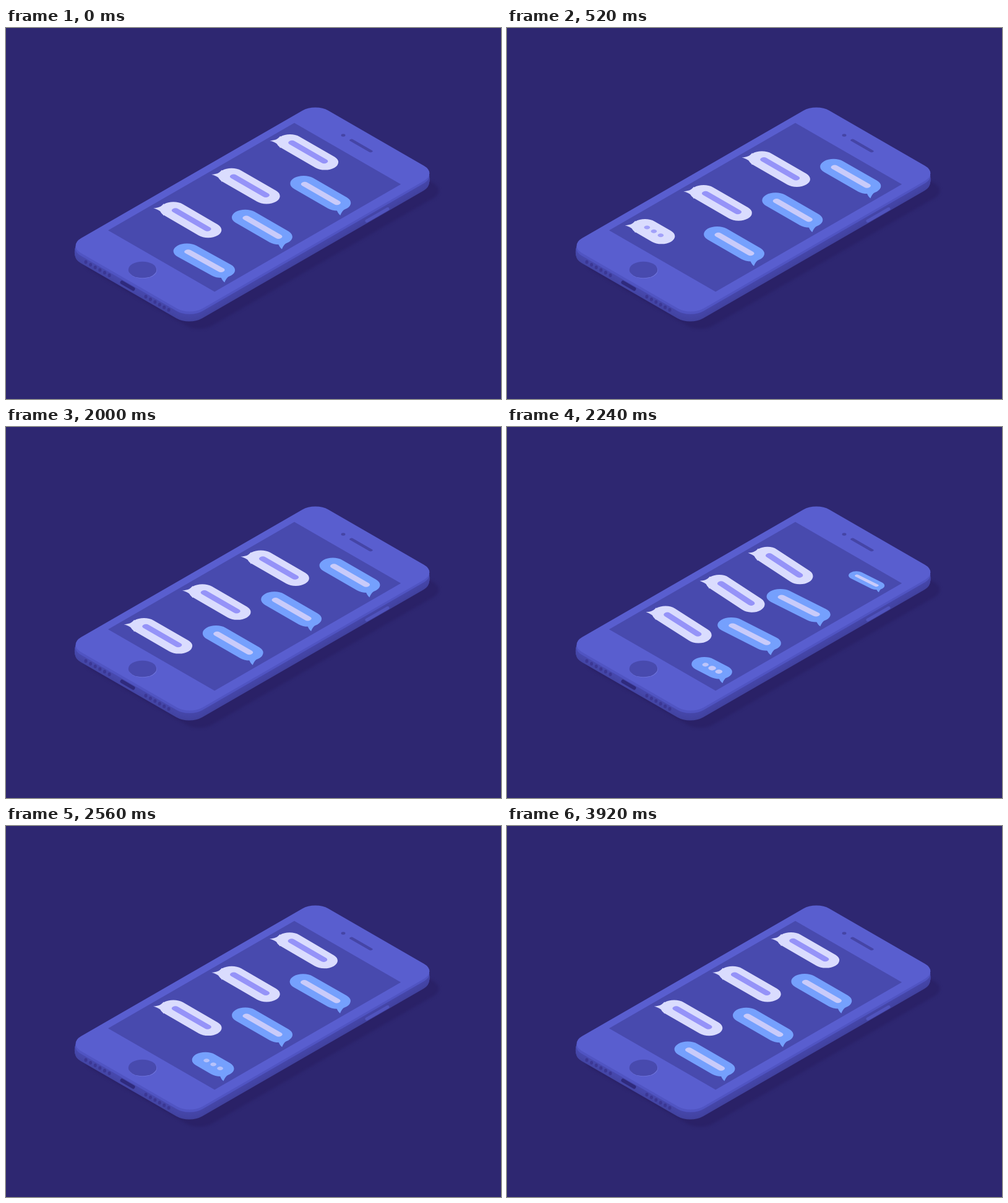
These frames come from a looping animation (800x600 px, 3960 ms). An HTML page with a canvas:

```html
<!DOCTYPE html>
<html lang="en">
<head>
<meta charset="utf-8">
<title>Chat on a phone</title>
<style>
  html, body { margin: 0; width: 100%; height: 100%; overflow: hidden; background: #2e2771; }
  canvas { display: block; width: 800px; height: 600px; }
</style>
</head>
<body>
<canvas id="stage" width="800" height="600"></canvas>
<script>
const ctx = document.getElementById('stage').getContext('2d');
const LOOP = 3960, LEAD = 40;
const COS = 0.866, SIN = 0.5;
const STEP = { x: 47.2, y: -27.4 };
const LAG = 28, REACH = 97;

const clamp = v => Math.max(0, Math.min(1, v));

// Damped spring from 0 to 1; a smaller damp overshoots more
function spring(ms, speed, damp) {
  if (ms <= 0) return 0;
  const x = ms * speed;
  return 1 - Math.exp(-damp * x) * (Math.cos(x) + damp * Math.sin(x));
}
const slide = ms => spring(ms, 0.0059, 1.6);
const pop = ms => spring(ms, 0.0105, 1);

function iso(x, y, draw) {
  ctx.save();
  ctx.transform(COS, SIN, -COS, SIN, x, y);
  draw();
  ctx.restore();
}

// Capsule lying on the screen plane, running across the phone
function capsule(x, y, len, r, color) {
  iso(x, y, () => {
    ctx.lineCap = 'round';
    ctx.lineWidth = 2 * r;
    ctx.strokeStyle = color;
    ctx.beginPath();
    ctx.moveTo(0, 0);
    ctx.lineTo(len || 0.01, 0);
    ctx.stroke();
  });
}

function slab(dx, dy, r, color) {
  iso(500 + dx, 145.4 + dy, () => {
    ctx.fillStyle = color;
    ctx.beginPath();
    ctx.roundRect(-r, -r, 179 + 2 * r, 413.4 + 2 * r, r);
    ctx.fill();
  });
}

function oval(x, y, rx, ry, color) {
  ctx.fillStyle = color;
  ctx.beginPath();
  ctx.ellipse(x, y, rx, ry, 0, 0, 7);
  ctx.fill();
}

function bar(x1, y1, x2, y2, width, color) {
  ctx.lineCap = 'round';
  ctx.lineWidth = width;
  ctx.strokeStyle = color;
  ctx.beginPath();
  ctx.moveTo(x1, y1);
  ctx.lineTo(x2, y2);
  ctx.stroke();
}

function drawPhone() {
  ctx.fillStyle = '#2e2771';
  ctx.fillRect(0, 0, 800, 600);

  ctx.save();
  ctx.filter = 'blur(2px)';
  slab(15, 28, 24, '#2a2167');
  ctx.restore();

  for (let dy = 16; dy >= 5; dy--) {
    const k = (16 - dy) / 11;
    const side = ctx.createLinearGradient(110, 0, 690, 0);
    side.addColorStop(0, `hsl(239 42% ${45 + 3 * k}%)`);
    side.addColorStop(0.25, `hsl(240 42% ${43 + 3 * k}%)`);
    side.addColorStop(0.35, `hsl(242 42% ${41 + 2 * k}%)`);
    side.addColorStop(1, `hsl(242 42% ${42 + 2 * k}%)`);
    slab(-0.8, dy, 24 + 0.8 * Math.sin(Math.PI * k), side);
  }
  slab(-0.3, 4, 24.2, '#5054c2');
  slab(0, 0, 24, '#595ecf');

  for (let i = 0; i < 6; i++) {
    oval(129 + 7.6 * i, 378.5 + 4.3 * i, 2.5, 2.9, '#3b3794');
    oval(226 + 7.4 * i, 434.5 + 4.3 * i, 2.5, 2.9, '#3b3794');
  }
  bar(187.5, 411.5, 205.5, 422, 6, '#2f2a7d');
  bar(583, 312, 617, 292.5, 5, '#5053bd');

  oval(221.1, 391.8, 22.8, 13.3, '#7176de');
  oval(220.5, 391, 22.8, 13.3, '#484aae');
  oval(545, 173.5, 3.4, 2.2, '#4545a6');
  capsule(558.5, 181.5, 35.5, 2.7, '#4545a6');
}

const WHITE = {
  fill: '#dadcfe', ink: '#9593f8', dir: 1,
  tip: [191, 319.5], body: [223, 321.5], short: 30.7, long: 65.2,
  text: [226.3, 322.5],
  tail: new Path2D('M190.5 319C198 319 203 317 207 312L220 320L207 331C205 327 203 323 190.5 319Z')
};
const BLUE = {
  fill: '#75a0fd', ink: '#c9cbfa', dir: -1,
  tip: [351, 412], body: [346.8, 392.5], short: 28.4, long: 63,
  text: [346, 392],
  tail: new Path2D('M351.5 412.5C348 410 346.5 406 345 402L350 390L365 398C358 402 354 406 351.5 412.5Z')
};

// at: time to half steps up the list, grow: 0 typing to 1 full message,
// beat: ms into the dot wave
function bubble(kind, t, at, grow = 1, size = 1, alpha = 1, beat = 0) {
  if (size <= 0) return;
  const { tip, body, text, dir, ink } = kind;
  const h = at(t);
  // The end far from the tail trails behind, which slants the bubble
  const trail = dir * (at(t - LAG) - h) / REACH;
  const sx = trail * STEP.x, sy = trail * STEP.y;

  ctx.save();
  ctx.globalAlpha = alpha;
  ctx.translate(STEP.x * h + tip[0], STEP.y * h + tip[1]);
  ctx.transform(1 + sx * SIN / COS, sy * SIN / COS, sx, 1 + sy, 0, 0);
  ctx.scale(size, size);
  ctx.translate(-tip[0], -tip[1]);

  ctx.fillStyle = kind.fill;
  ctx.fill(kind.tail);
  capsule(...body, dir * (kind.short + (kind.long - kind.short) * grow), 17.7, kind.fill);

  if (grow < 1) {
    for (let i = 0; i < 3; i++) {
      const wave = Math.sin(Math.PI * clamp((beat - 80 * i) / 320)) ** 2;
      const fade = i ? clamp(1 - 3 * grow) : 1;
      ctx.globalAlpha = alpha * fade * (0.8 + 0.2 * wave);
      const d = 12.7 * i * dir;
      capsule(text[0] + d * COS, text[1] + d * SIN, 0, 4 + 1.4 * wave, ink);
    }
  }
  if (grow > 0) {
    ctx.globalAlpha = alpha * clamp(0.8 + grow);
    capsule(...text, dir * 60 * grow, 4 + clamp(grow * 3), ink);
  }
  ctx.restore();
}

function leaving(kind, t, at, start) {
  const left = 1 - clamp((t - start) / 300);
  bubble(kind, t, at, 1, left, clamp(left * 3));
}

// Path of a bubble that rests at a slot and moves up half a step at each start time
const climb = (slot, ...starts) => t => starts.reduce((h, s) => h + slide(t - s), slot);

function drawChat(t) {
  leaving(WHITE, t, climb(5, 80), 30);
  bubble(WHITE, t, climb(3, 50, 2167));
  bubble(WHITE, t, climb(1, -12, 2087));

  leaving(BLUE, t, climb(4, 95, 2150), 2110);
  bubble(BLUE, t, climb(2, 39, 2152));
  bubble(BLUE, t, climb(0, -26, 2080));

  const up = climb(-1, 2041);
  bubble(WHITE, t, ms => up(ms) + pop(ms), clamp(spring(t - 1500, 0.0065, 1.6)),
    clamp(pop(t)), 1, (t + 880) % 920);

  bubble(BLUE, t, ms => pop(ms - 2050) - 1, clamp(spring(t - 3180, 0.0045, 1.6)),
    clamp(pop(t - 2050)), 1, (t - 2020) % 920);
}

function frame(now) {
  const t = (now + LEAD) % LOOP - LEAD;
  drawPhone();
  ctx.save();
  iso(466, 153.4, () => {
    ctx.beginPath();
    ctx.rect(0, 0, 198.8, 347.6);
    ctx.fillStyle = '#484aae';
    ctx.fill();
  });
  ctx.clip();
  drawChat(t);
  ctx.restore();
}

const begin = performance.now();
function tick() {
  frame(performance.now() - begin);
  requestAnimationFrame(tick);
}
tick();
</script>
</body>
</html>
```
